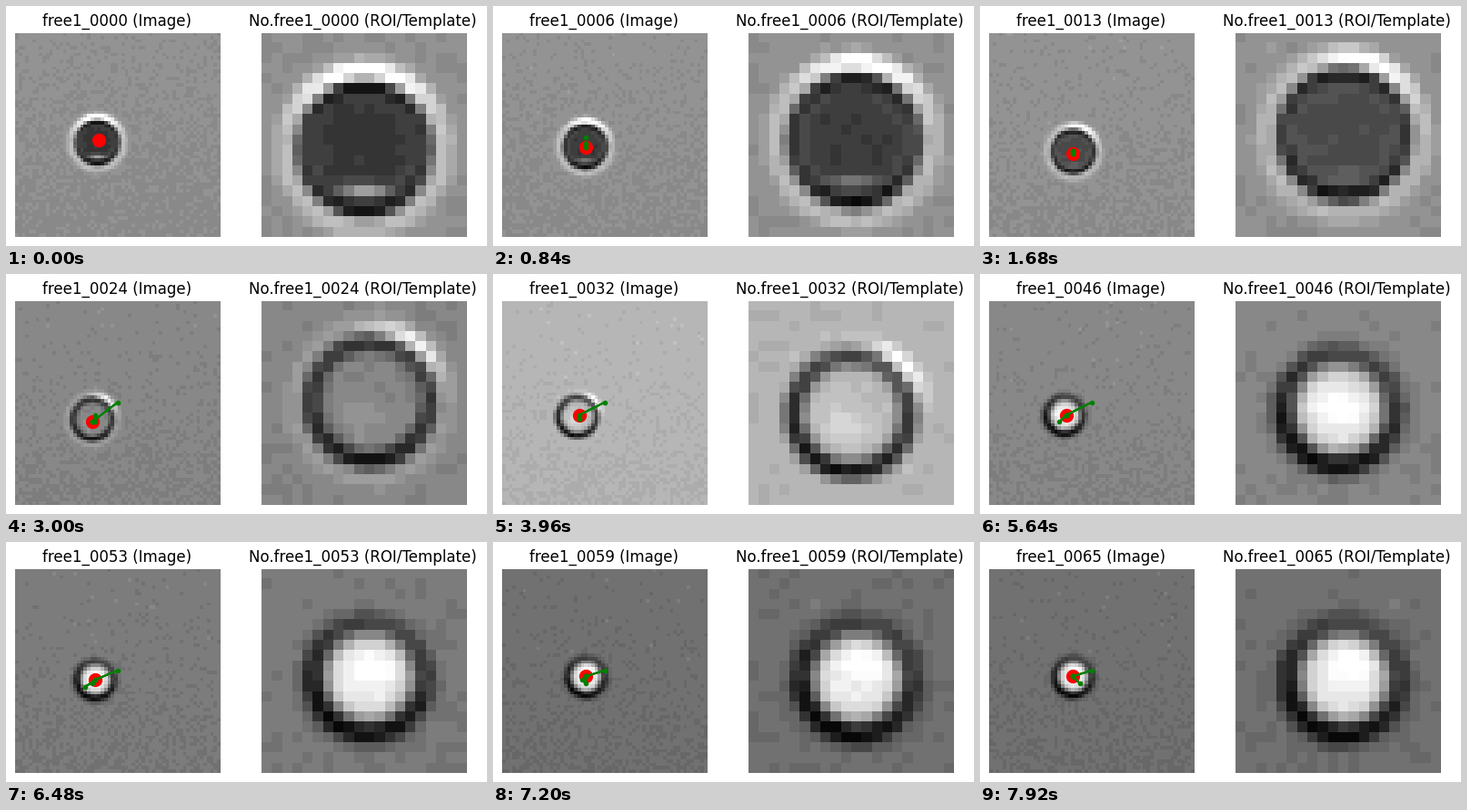
A matplotlib script for the animation above (8 s loop, 529x265 px).

```python
import numpy as np
import matplotlib.pyplot as plt
from matplotlib.animation import FuncAnimation

W, H, DPI = 529, 265, 100
SIZE, HALF = 60, 10          # image side and half the template side, in cells
SIDE = 225.45                # panel side in pixels
TICK, STEP, LOOP = 40, 120, 8000
GREY_STEP = 10.6
ANCHOR = (29.45, 29.25)
ANCHOR_FROM = 18

# key points over the picture index
KEYS = [0, 13, 24, 32, 46, 59]
PARTICLE_X = [23.5, 24.1, 22.1, 21.5, 21.6, 24.1]
PARTICLE_Y = [31.9, 34.5, 34.4, 33.6, 33.2, 31.3]
TRACKED_Y = [31, 35, 35, 33, 33, 31]
BACKGROUND = [148, 147, 136, 182, 136, 114]

YY, XX = np.mgrid[:SIZE, :SIZE]


def at(k, values):
    return np.interp(k, KEYS, values)


def bell(x, width):
    return np.exp(-(x / width) ** 2)


def logistic(x):
    return 1 / (1 + np.exp(-x))


def tracked(k):
    return np.rint([at(k, PARTICLE_X), at(k, TRACKED_Y)]).astype(int)


def match(k):
    """Tracked position, with a stray match every sixth picture."""
    slip = np.sign(k - 32) * np.array([np.sin(np.pi * (k - 56) / 18), 1])
    return tracked(k) + (np.rint(2 * slip) if k % 6 == 2 else 0)


def particle(k, base):
    dx, dy = XX - at(k, PARTICLE_X), YY - at(k, PARTICLE_Y)
    r = np.hypot(dx, dy)
    ux, uy = dx / (r + 1e-6), dy / (r + 1e-6)
    focus = logistic((k - 25.5) / 6)
    blur = 1 - focus

    # core turning from dark to bright
    core = 56 + 182 * focus
    grey = base + (core - base) * logistic((5.5 - 1.5 * focus - r) / 0.5)

    # glints: a low arc that fades, then a spot that climbs
    grey += 110 * np.exp(-k / 10) * bell(dx, 2.4) * bell(dy - 4, 0.7)
    climb = np.clip((k - 32) / 27, 0, 1)
    grey += 42 * focus * bell(dx + 0.7 - 1.4 * climb, 2.2) \
        * bell(dy - 1.2 + 2.7 * climb, 1.5)

    # dark ring, heavier at the poles first and low left later
    radius = 6 - 0.5 * focus
    ring = bell(r - radius, 0.8 + 0.35 * focus)
    grey += 0.88 * ring * (28 - grey)
    grey -= ring * (45 * blur ** 2 * (uy ** 2 - 0.4) + focus * (30 * uy - 12 * ux))

    # bright halo, its peak turning from the top to the right
    rim = r - radius - 1.7 + 0.5 * focus
    angle = np.pi / 4 * (k / 32 - 2)
    facing = np.clip(ux * np.cos(angle) + uy * np.sin(angle), 0, 1)
    peak = 95 * np.clip((44 - k) / 10, 0, 1) * facing ** (2 + k / 6)
    return grey + 50 * blur * bell(rim, 1.2) + peak * bell(rim, 0.9)


def picture(k):
    base = at(k, BACKGROUND)
    noise = np.random.default_rng(100 + k).normal(0, 0.25, XX.shape)
    noise -= 0.25 * np.exp(-k / 15) + 0.5 * YY / SIZE
    levels = np.rint((particle(k, base) - base) / GREY_STEP + noise)
    return np.clip(base + GREY_STEP * levels, 0, 255)


def trail(k):
    pts = [match(j) for j in range(max(0, k - 4), k)]
    if k >= ANCHOR_FROM:
        pts.append(ANCHOR)
    if k:
        pts.append(tracked(k))
    return np.array(pts).reshape(-1, 2)


def panel(left, cells):
    ax = fig.add_axes([left / W, (H - 30 - SIDE) / H, SIDE / W, SIDE / H])
    im = ax.imshow(np.zeros((cells, cells)), cmap="gray", vmin=0, vmax=255,
                   interpolation="nearest", aspect="auto")
    ax.set_axis_off()
    return ax, im, ax.set_title("", fontsize=12, x=0.5 - 1 / SIDE)


plt.rcParams["font.family"] = "DejaVu Sans"
fig = plt.figure(figsize=(W / DPI, H / DPI), dpi=DPI, facecolor="white")
ax, full, full_title = panel(10, SIZE)
_, roi, roi_title = panel(280.5, 2 * HALF)
dot, = ax.plot([], [], "ro", ms=10)
line, = ax.plot([], [], "g.-", lw=1.5, ms=6)
ax.set(xlim=(-0.5, SIZE - 0.5), ylim=(SIZE - 0.5, -0.5))


def update(i):
    k = max(0, i * TICK // STEP - 1)
    img = picture(k)
    x, y = tracked(k)
    full.set_data(img)
    roi.set_data(img[y - HALF:y + HALF, x - HALF:x + HALF])
    dot.set_data([x], [y])
    line.set_data(*trail(k).T)
    full_title.set_text(f"free1_{k:04d} (Image)")
    roi_title.set_text(f"No.free1_{k:04d} (ROI/Template)")
    return full, roi, dot, line, full_title, roi_title


anim = FuncAnimation(fig, update, frames=LOOP // TICK, interval=TICK,
                     repeat=True, repeat_delay=0)
plt.show()
```
